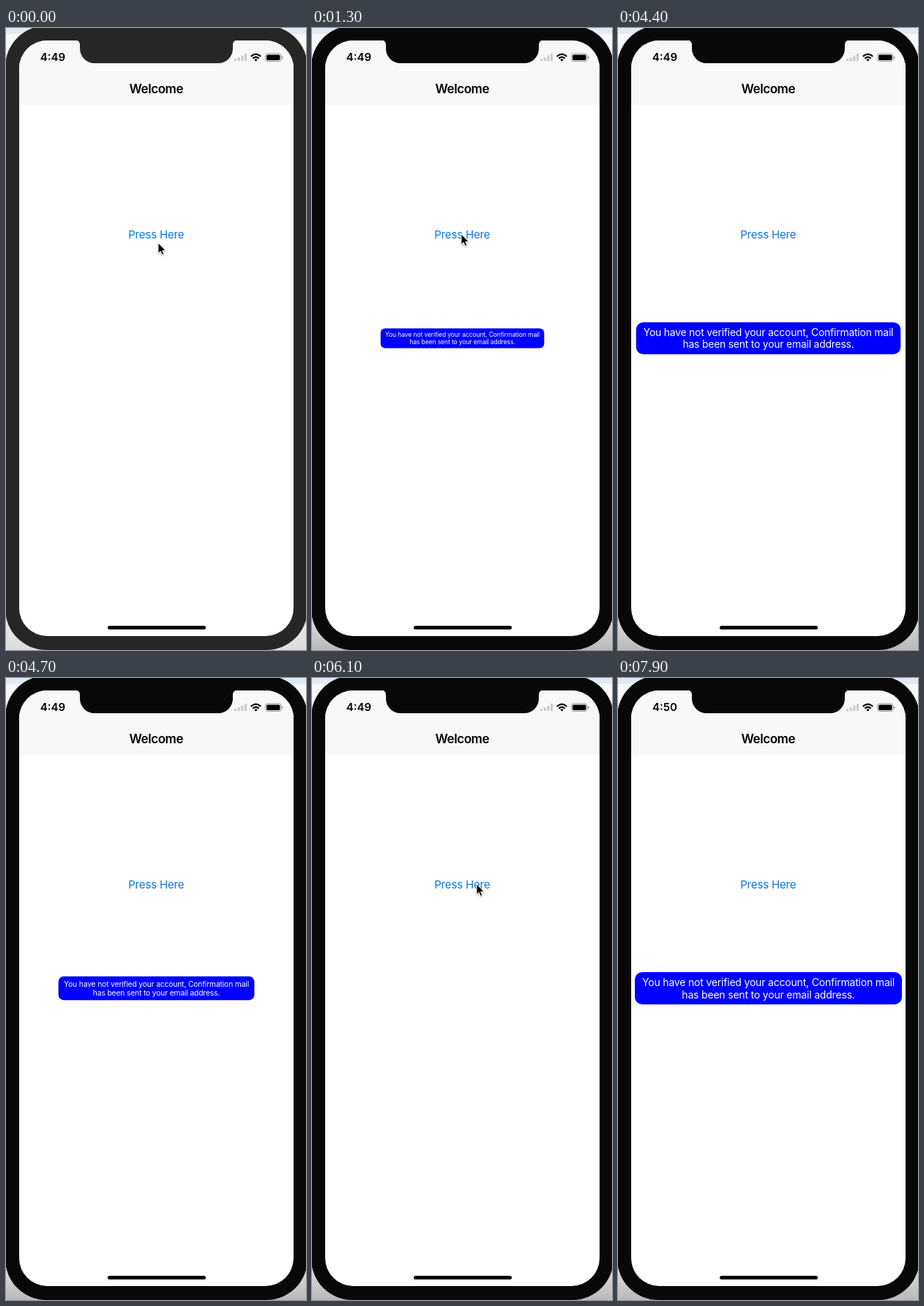
These frames come from a looping animation (410x848 px, 8 s). An HTML page:

```html
<!DOCTYPE html>
<html lang="en">
<head>
<meta charset="utf-8">
<title>Welcome</title>
<style>
html, body { margin: 0; width: 100%; height: 100%; overflow: hidden; background: #fff; }
svg { display: block; width: 410px; height: 848px; }
text { font-family: Inter, "Liberation Sans", sans-serif; text-anchor: middle; }
#clock { font-size: 15px; font-weight: 600; }
#title { font-size: 17px; font-weight: 600; letter-spacing: -.41px; }
#button { font-size: 15px; letter-spacing: -.15px; fill: #007aff; fill: #0a78e0; }
#toast text { font-size: 14px; letter-spacing: -.19px; fill: #fff; }
</style>
</head>
<body>
<svg viewBox="0 0 410 848">
  <defs>
    <linearGradient id="floor" x2="0" y2="1">
      <stop stop-color="#f4f4f4"/>
      <stop id="shade" offset="1"/>
    </linearGradient>
    <filter id="soft" x="-50%" y="-50%" width="200%" height="200%">
      <feDropShadow dx="0" dy="1" stdDeviation="1" flood-opacity=".4"/>
    </filter>
  </defs>
  <rect width="410" height="848" fill="#f8f8f8"/>
  <rect width="410" height="8" fill="#e1eaf7"/>
  <rect y="780" width="410" height="68" fill="url(#floor)"/>
  <rect id="bezel" x="-1" y="-3" width="413" height="851" rx="56"/>

  <rect x="18" y="17" width="375" height="812" rx="38" fill="#fff"/>
  <path d="M18 105V55A38 38 0 0 1 56 17H355A38 38 0 0 1 393 55V105Z" fill="#f8f8f8"/>
  <path id="notch" d="M95 16.5Q101 17 101 23V28A20 20 0 0 0 121 48H290A20 20 0 0 0 310 28V23Q310 17 316 16.5Z"/>
  <rect x="139" y="815" width="134" height="5" rx="2.5"/>

  <text id="clock" x="64" y="45.3"></text>
  <path d="M312 42h3v3h-3zM316.7 40h3v5h-3zM321.4 37.5h3v7.5h-3zM326 35h3v10h-3z" fill="#cbcbcb"/>
  <g fill="none" stroke="#000" stroke-width="2.1">
    <path d="M334.7 38.8Q341.5 32.4 348.3 38.8M337.3 41.5Q341.5 37.7 345.7 41.5"/>
    <path d="M339.3 43.2Q341.5 41.3 343.7 43.2L341.5 45.5Z" fill="#000" stroke="none"/>
  </g>
  <rect x="354.5" y="35" width="21.5" height="10.5" rx="3" fill="none" stroke="#999"/>
  <rect x="356" y="36.5" width="18.5" height="7.5" rx="1.7"/>
  <path d="M377 38.3q1.5 .5 1.5 2t-1.5 2z" fill="#999"/>

  <text id="title" x="205.3" y="89.3">Welcome</text>
  <text id="button" x="205.3" y="287.4">Press Here</text>

  <g id="toast">
    <rect x="-182.5" y="-22" width="365" height="44" rx="10" fill="#00f"/>
    <text y="-3.3">You have not verified your account, Confirmation mail</text>
    <text y="13.5">has been sent to your email address.</text>
  </g>

  <path id="cursor" d="M0 0V14.2L3.2 11.3 5.3 16.3 7.8 15.2 5.7 10.3H10Z" stroke="#fff" stroke-width=".9" filter="url(#soft)"/>
</svg>
<script>
const $ = id => document.getElementById(id);
const LOOP = 8000, STEP = 100;

// Linear interpolation through [time, value] pairs, held at both ends.
function track(t, keys) {
  let [t0, v0] = keys[0];
  for (const [t1, v1] of keys) {
    if (t < t1) return t <= t0 ? v0 : v0 + (v1 - v0) * (t - t0) / (t1 - t0);
    [t0, v0] = [t1, v1];
  }
  return v0;
}

const ease = x => (1 - Math.cos(Math.PI * x)) / 2;
const grow = t => ease(track(t, [[0, 0], [800, .763], [1000, 1]]));
const shrink = t => 1 - ease(track(t, [[4334, 0], [5000, .628], [5200, .766], [5400, 1]]));

function toastScale(t) {
  return t < 4334 ? grow(t - 700) : t < 6000 ? shrink(t) : grow(t - 6600);
}

function cursorAt(t) {
  if (t < 2000) return [track(t, [[0, 208], [200, 204]]), track(t, [[0, 293], [200, 281]])];
  if (t < 5700 || t >= 7900) return null;
  const rest = (1 - track(t, [[5700, 0], [6100, 1]])) ** 2;
  return [225 + 111 * rest, 281 + 47 * rest];
}

function buttonOpacity(t) {
  const since = t - (t < 6000 ? 700 : 6600);
  return since < 0 ? 1 : track(since, [[0, .3], [300, 1]]);
}

function draw(now) {
  const t = Math.floor(now % LOOP / STEP) * STEP;
  const active = t >= 600;
  $('bezel').setAttribute('fill', active ? '#080808' : '#262626');
  $('notch').setAttribute('fill', active ? '#080808' : '#262626');
  $('shade').setAttribute('stop-color', active ? '#b8b8b8' : '#dcdcdc');
  $('clock').textContent = t < 7800 ? '4:49' : '4:50';
  $('button').setAttribute('opacity', buttonOpacity(t));

  const scale = toastScale(t);
  $('toast').style.display = scale > .002 ? '' : 'none';
  $('toast').setAttribute('transform', `translate(205.5 423) scale(${scale})`);

  const tip = cursorAt(t);
  $('cursor').style.display = tip ? '' : 'none';
  if (tip) $('cursor').setAttribute('transform', `translate(${tip})`);
}

function frame(now) {
  draw(now);
  requestAnimationFrame(frame);
}
draw(0);
requestAnimationFrame(frame);
</script>
</body>
</html>
```
